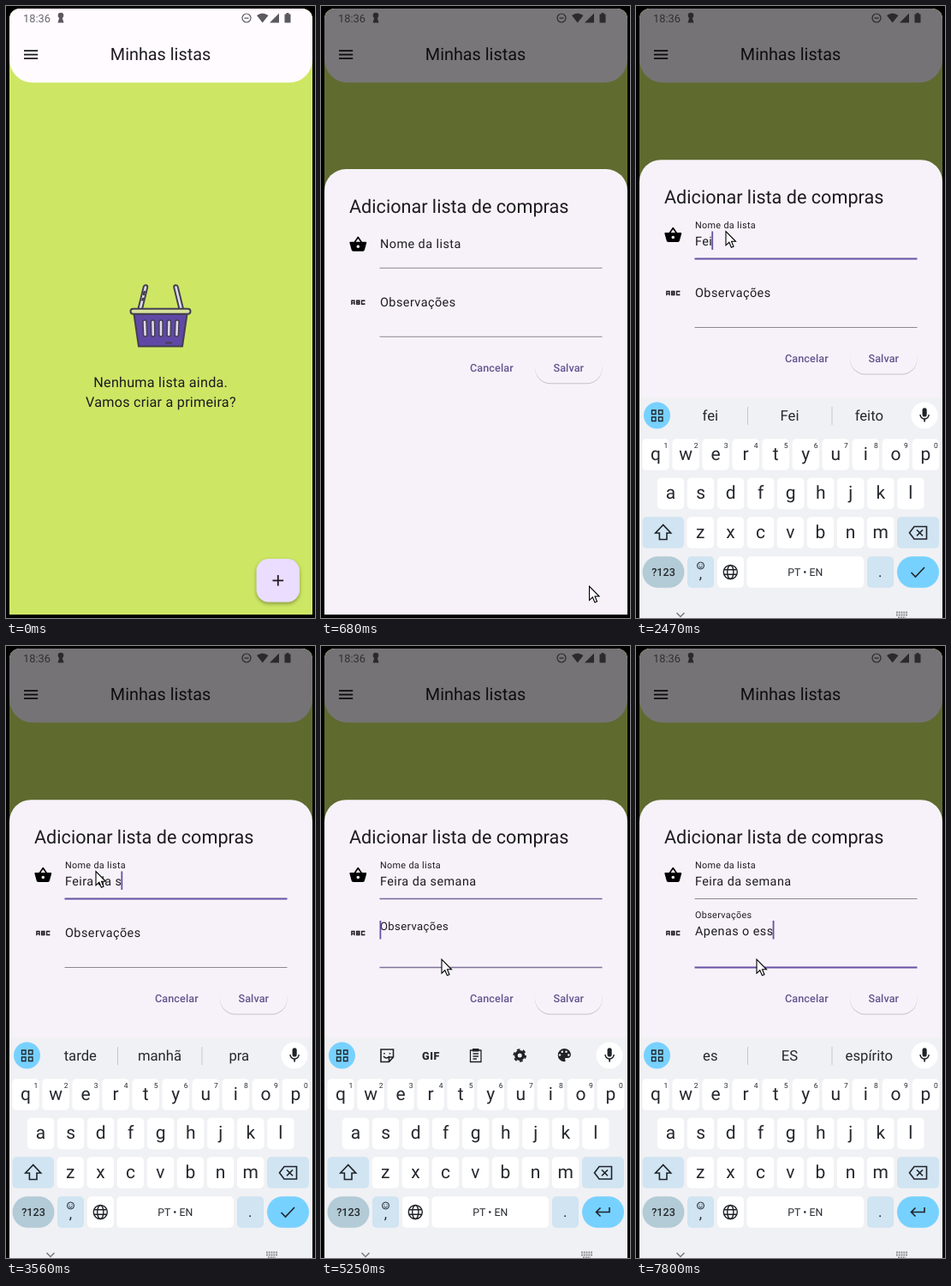
Recreate the animation shown at these times as an HTML page. Size 361 by 713 pixels, loop 8 s.

```html
<!DOCTYPE html>
<html lang="pt">
<head>
<meta charset="utf-8">
<style>
html, body { margin: 0; width: 100%; height: 100%; overflow: hidden; background: #000; }
svg { display: block; width: 361px; height: 713px; font-family: Roboto, sans-serif; text-rendering: geometricPrecision; }
text { fill: #1d1b20; white-space: pre; }
#board text { fill: #25282d; }
.body { font-size: 14.42px; letter-spacing: .45px; }
.mid { text-anchor: middle; }
.line { fill: none; stroke: #1f2328; stroke-width: 1.6; }
.thin { stroke-width: 1.3; }
.btn { font-size: 12.62px; font-weight: 500; letter-spacing: .09px; fill: #65558f; }
.caret { fill: #6750a4; }
.lift { filter: drop-shadow(0 2px 2px #0005); }
.flat { filter: drop-shadow(0 1px .7px #0003); }
</style>
</head>
<body>
<svg viewBox="0 0 361 713">
  <defs>
    <clipPath id="phone"><path d="M4 709V15a12 12 0 0 1 12-12H346a12 12 0 0 1 12 12V709z"/></clipPath>
    <clipPath id="kbArea"><path d="M4 0H358V713H4z"/></clipPath>
  </defs>
  <g clip-path="url(#phone)">
    <path d="M0 0H361V713H0z" fill="#cde764"/>
    <path d="M4 0H358V62a27 27 0 0 1-27 27.300H31A27 27 0 0 1 4 62z" fill="#fffbff"/>
    <g fill="#5b5960">
      <text x="20" y="18.500" font-size="12.800" style="fill:#68666c">18:36</text>
      <circle cx="64" cy="11" r="3.300"/><path d="M62.500 13h3l2 6.500h-7z"/>
      <circle cx="281" cy="14" r="5" fill="none" stroke="#5b5960" stroke-width="1.200"/>
      <path d="M278.500 13.400h5v1.300h-5zM293 11q6.500-5 13.500 0L299.700 19.500zM308 19.500L319 8.500V19.500zM325.500 9.500h2V8h3v1.500h2v10h-7z"/>
    </g>
    <path d="M21 52.200h16.200M21 56.700h16.200M21 61.200h16.200" stroke="#1d1b20" stroke-width="1.800"/>
    <text class="mid" x="180.500" y="63" font-size="19.830">Minhas listas</text>
    <g stroke="#443f52" stroke-width="2" stroke-linejoin="round" stroke-linecap="round">
      <path d="M163 327.500L156.500 354M198.500 327.500L205 354" stroke-width="6.500"/>
      <path d="M163 327.500L156.500 354M198.500 327.500L205 354" stroke="#dedbe9" stroke-width="2.600"/>
      <path d="M161.700 333l-.8 3M160 341l-.4 1.500" stroke-width="2.600"/>
      <path d="M149.500 359H211.500L206 396.500H155z" fill="#5f49a5"/>
      <rect x="145.500" y="352.700" width="70" height="6" rx="3" fill="#d6e29a"/>
      <path id="slots" stroke-width="5.600"/>
      <path id="slotsIn" stroke="#dcd9e8" stroke-width="2.600"/>
      <path d="M187 392.500h6"/>
    </g>
    <g class="mid" font-size="16.220" letter-spacing=".225">
      <text x="180.700" y="443.700">Nenhuma lista ainda.</text>
      <text x="180.900" y="467">Vamos criar a primeira?</text>
    </g>
    <rect class="lift" x="292.500" y="644" width="50.500" height="50.500" rx="14.400" fill="#eaddff"/>
    <path d="M311.500 669.300h12.600M317.800 663v12.600" stroke="#1d1b20" stroke-width="1.800"/>
    <path id="scrim" d="M0 0H361V713H0z"/>
    <g id="sheet">
      <rect x="4" y="-.8" width="354" height="740" rx="25.200" fill="#f7f2fa"/>
      <text x="33" y="50" font-size="21.630">Adicionar lista de compras</text>
      <path transform="translate(32.500 76) scale(.9)" fill-rule="evenodd" d="M17.210 9l-4.380-6.560a1 1 0 0 0-1.660 0L6.790 9H2a1 1 0 0 0-.96 1.270l2.540 9.270A2 2 0 0 0 5.500 21h13a2 2 0 0 0 1.930-1.460l2.540-9.270L23 10a1 1 0 0 0-1-1zM9 9l3-4.400L15 9zm3 8a2 2 0 1 1 0-4 2 2 0 0 1 0 4z"/>
      <path transform="translate(32.500 143.700) scale(.9)" fill="none" stroke="#1d1b20" stroke-width="1.500" d="M3.750 15V9.750h3.500V15M3.750 12.750h3.500M10.250 9.750h3.500v4.500h-3.500zM10.250 12h3.500M20.250 11V9.750h-3.500v4.500h3.500V13"/>
      <g id="fields"></g>
      <text class="btn" x="174" y="235">Cancelar</text>
      <rect class="flat" x="250" y="212.500" width="78.500" height="36" rx="18" fill="#f7f2fa"/>
      <text class="btn" x="271.500" y="235">Salvar</text>
    </g>
  </g>
  <g clip-path="url(#kbArea)"><g id="board"></g></g>
  <path id="mouse" d="M.5.500V16.800L4.300 13.300 6.900 19.300 9.500 18.200 7 12.300H12z" fill="#fff" stroke="#000" stroke-width="1.100"/>
</svg>
<script>
const $ = id => document.getElementById(id);
const set = (el, attrs) => { for (const k in attrs) el.setAttribute(k, attrs[k]); };
const clamp = x => Math.min(1, Math.max(0, x));
const mix = (a, b, p) => a + (b - a) * p;

// Cubic Bezier easing, solved by bisection
function bezier(x1, y1, x2, y2) {
  const at = (a, b, s) => 3 * (1 - s) ** 2 * s * a + 3 * (1 - s) * s * s * b + s ** 3;
  return x => {
    if (x <= 0 || x >= 1) return clamp(x);
    let lo = 0, hi = 1;
    for (let i = 0; i < 24; i++) {
      const s = (lo + hi) / 2;
      if (at(x1, x2, s) < x) lo = s; else hi = s;
    }
    return at(y1, y2, lo);
  };
}
const decel = bezier(0, 0, .2, 1), ease = bezier(.25, .1, .25, 1), standard = bezier(.4, 0, .2, 1);
const tween = (t, start, length, curve) => curve((t - start) / length);

// Basket slots
const slots = [162, 171.5, 181, 190.5, 200].map((x, i) => `M${x} 368L${x + (2 - i) * .3} 383`).join('');
set($('slots'), { d: slots });
set($('slotsIn'), { d: slots });

// Form fields; key times give the moment each character appears
const fields = [
  { label: 'Nome da lista', text: 'Feira da semana', focus: 1450, blur: 5200, rest: 91, up: 79, base: 99, rule: 114.5, caret: 82.5,
    keys: [2200, 2330, 2470, 2600, 2740, 3290, 3360, 3420, 3490, 3560, 3760, 3830, 3960, 4030, 4100] },
  { label: 'Observações', text: 'Apenas o ess', focus: 5200, blur: 1e9, rest: 159, up: 137, base: 156.7, rule: 194.5, caret: 140,
    keys: [5730, 5800, 6000, 6130, 6330, 6400, 6730, 6800, 6870, 7470, 7670, 7800] }
];
$('fields').innerHTML = fields.map(f => `<g><path d="M68.500 ${f.rule}H328.500"/><text class="body">${f.label}</text>
  <text class="body" x="69" y="${f.base}"></text><rect class="caret" y="${f.caret}" width="1.800" height="21.500"/></g>`).join('');
fields.forEach((f, i) => [f.line, f.tag, f.value, f.bar] = $('fields').children[i].children);

// Keyboard
const cap = (x, y, w, fill = '#fff', r = 5) => `<rect x="${x}" y="${y - 18.3}" width="${w}" height="36.600" rx="${r}" fill="${fill}"/>`;
const label = (x, y, s, size, more = '') => `<text class="mid" x="${x}" y="${y}" font-size="${size}" ${more}>${s}</text>`;
const letters = (row, x0, y, digits) => [...row].map((c, i) => {
  const x = x0 + i * 35.05;
  return cap(x - 15.7, y, 31.4) + label(x, y + 6, c, 21) + (digits ? label(x + 12, y - 7.8, (i + 1) % 10, 8.5) : '');
}).join('');
const dots = (points, r, fill) => points.map(([x, y]) => `<circle cx="${x}" cy="${y}" r="${r}" fill="${fill}"/>`).join('');
const blue = '#d0e4f2', sky = '#77d1ff', ink = '#1f2328';

$('board').innerHTML = `<path d="M4 456H358V760H4z" fill="#f0f1f4"/>
  <circle cx="24.500" cy="477" r="15.500" fill="${sky}"/>
  <path class="line thin" d="M18.500 471h4.500v4.500h-4.500zM26.500 471h4.500v4.500h-4.500zM18.500 479h4.500v4.500h-4.500zM26.500 479h4.500v4.500h-4.500z"/>
  <circle cx="337" cy="477" r="15.500" fill="#fff"/>
  <path transform="translate(326.800 466.500) scale(.86)" fill="${ink}" d="M12 14a3 3 0 0 0 3-3V5a3 3 0 0 0-6 0v6a3 3 0 0 0 3 3zM17 11a5 5 0 0 1-10 0H5.300c0 3.400 2.700 6.200 5.700 6.700V21h2v-3.300c3-.5 5.700-3.300 5.700-6.700z"/>
  <g id="tools">
    <path class="line" d="M70 470h14.500v9l-5 5.500H70zM84 479h-4.500v5M73 478q3.500 4 7 0M74 474v1.500M80.500 474v1.500"/>
    ${label(128.5, 481.5, 'GIF', 12.6, 'font-weight="800" letter-spacing=".5"')}
    <path class="line thin" d="M174.500 471h12.500v13.500h-12.500zM177.500 475h6.500M177.500 478h6.500M177.500 481h4.500"/>
    <path d="M177 469h7.500v3.500h-7.500z" fill="${ink}"/>
    <circle cx="232.200" cy="477" r="4.300" fill="none" stroke="${ink}" stroke-width="3.600"/>
    <circle cx="232.200" cy="477" r="6.800" fill="none" stroke="${ink}" stroke-width="2" stroke-dasharray="3.600 3.520"/>
    <path transform="translate(275.200 467.900) scale(.76)" fill="${ink}" d="M12 1.500a10 10 0 0 0 0 20c1 0 1.700-.7 1.700-1.700 0-.9-.8-1.300-.8-2.200 0-.9.700-1.600 1.700-1.600H17c2.800 0 5-2.300 5-5 0-5.300-4.500-9.500-10-9.500z"/>
    ${dots([[279, 476.500], [281.800, 472.700], [286.500, 472.700], [289.300, 476.500]], 1.2, '#f0f1f4')}
  </g>
  <g id="words"><path d="M130.500 467v21M229 467v21" stroke="#c6c7cb"/>${[86.8, 179.5, 272.3].map(x => label(x, 483, '', 16.7)).join('')}</g>
  ${letters('qwertyuiop', 23, 522.5, true)}${letters('asdfghjkl', 40.5, 568)}${letters('zxcvbnm', 75.3, 613.5)}
  ${cap(7.5, 613.5, 48.5, blue)}${cap(305, 613.5, 49, blue)}
  <path class="line" d="M31.700 604.500l-9 9.500h4.700v7.500h8.600V614h4.700zM325 606.500h14.500v14.500H325l-5.500-7.200zM328 610.200l7 7M335 610.200l-7 7"/>
  ${cap(7.5, 659.5, 49, '#b3cbd7', 18.3)}${label(32, 664, '?123', 12.6, 'font-weight="500"')}
  ${cap(60, 659.5, 31, blue)}${label(75.5, 667, ',', 17)}
  <circle class="line" cx="75.500" cy="652" r="4" style="stroke-width:1"/><path class="line" style="stroke-width:1" d="M73.500 653q2 2.500 4 0M74 650.500v1M77 650.500v1"/>
  ${cap(95, 659.5, 31)}
  <g class="line" style="stroke-width:1.400"><circle cx="110.300" cy="659.500" r="8"/><ellipse cx="110.300" cy="659.500" rx="3.600" ry="8"/><path d="M103 656.700h14.600M103 662.300h14.600"/></g>
  ${cap(129.5, 659.5, 136.5)}${label(197.8, 664, 'PT • EN', 12.3)}
  ${cap(270, 659.5, 31, blue)}${label(285.3, 665, '.', 17)}
  ${cap(305, 659.5, 49, sky, 18.3)}
  <path id="action" class="line"/>
  <path d="M47.500 707l4.500 4.500 4.500-4.500" fill="none" stroke="#77797d" stroke-width="1.500"/>
  <path d="M304 706.500h13M304 709.500h13M306 712.500h9" stroke="#85878b" stroke-width="1.800" stroke-dasharray="1.800 1"/>`;
const wordEls = $('words').querySelectorAll('text');

// Word suggestions by start time; an empty entry shows the tool icons
const hints = [
  [0, ''], [2200, 'f|F|foi'], [2470, 'fei|Fei|feito'], [2940, 'feirinha|Feira|feiras'], [3360, 'da|de|do'],
  [3560, 'tarde|manhã|pra'], [3830, 'sem|se|semana'], [4100, 'semana|sempre|seman'], [4300, 'semana|semanal|semanais'],
  [5225, ''], [5800, 'a|A|as'], [6130, 'ape|Ape|apenas'], [6530, 'apenas|Apenas|apesar'],
  [6870, 'o|os|um'], [7070, 'que|melhor|dia'], [7670, 'es|ES|espírito']
];

// Pointer stops: start, duration, x, y
const moves = [[60, 150, 315, 677], [560, 110, 313, 675.5], [720, 660, 104.5, 262], [4620, 500, 140.5, 364.5]];

function drawField(f, t) {
  const on = tween(t, f.focus, 167, standard), lit = on - tween(t, f.blur, 167, standard);
  set(f.line, { stroke: `rgb(${mix(140, 103, lit)},${mix(136, 80, lit)},${mix(145, 164, lit)})`, 'stroke-width': mix(1, 1.8, lit) });
  set(f.tag, { transform: `translate(69 ${mix(f.rest, f.up, on)}) scale(${mix(1, .75, on)})` });
  const n = f.keys.filter(k => k <= t).length;
  f.value.textContent = f.text.slice(0, n);
  const since = t - (n ? f.keys[n - 1] : f.focus);
  const show = t >= f.focus && t < f.blur && since % 1000 < 500;
  set(f.bar, { x: 68.5 + (n ? f.value.getComputedTextLength() - .5 : 0), opacity: show ? 1 : 0 });
}

function draw(t) {
  set($('scrim'), { opacity: .54 * tween(t, 473, 257, ease) });
  set($('sheet'), { transform: `translate(0 ${mix(710, 180, tween(t, 473, 257, decel))})` });
  fields.forEach(f => drawField(f, t));

  set($('board'), { transform: `translate(0 ${mix(258, 0, tween(t, 1682, 285, decel))})` });
  const words = hints.filter(h => h[0] <= t).pop()[1];
  set($('tools'), { opacity: words ? 0 : 1 });
  set($('words'), { opacity: words ? 1 : 0 });
  words.split('|').forEach((w, i) => wordEls[i].textContent = w);
  set($('action'), { d: t < 5225 ? 'M321.500 660l5 5 10.500-11' : 'M337 654v5.500h-15M326.500 654.500l-5 5 5 5' });

  let x = 317, y = 714;
  for (const [start, length, tx, ty] of moves) {
    const p = tween(t, start, length, standard);
    x = mix(x, tx, p);
    y = mix(y, ty, p);
  }
  set($('mouse'), { transform: `translate(${x} ${y})` });
}

const begin = performance.now();
function loop() {
  draw((performance.now() - begin) % 8000);
  requestAnimationFrame(loop);
}
loop();
</script>
</body>
</html>
```
